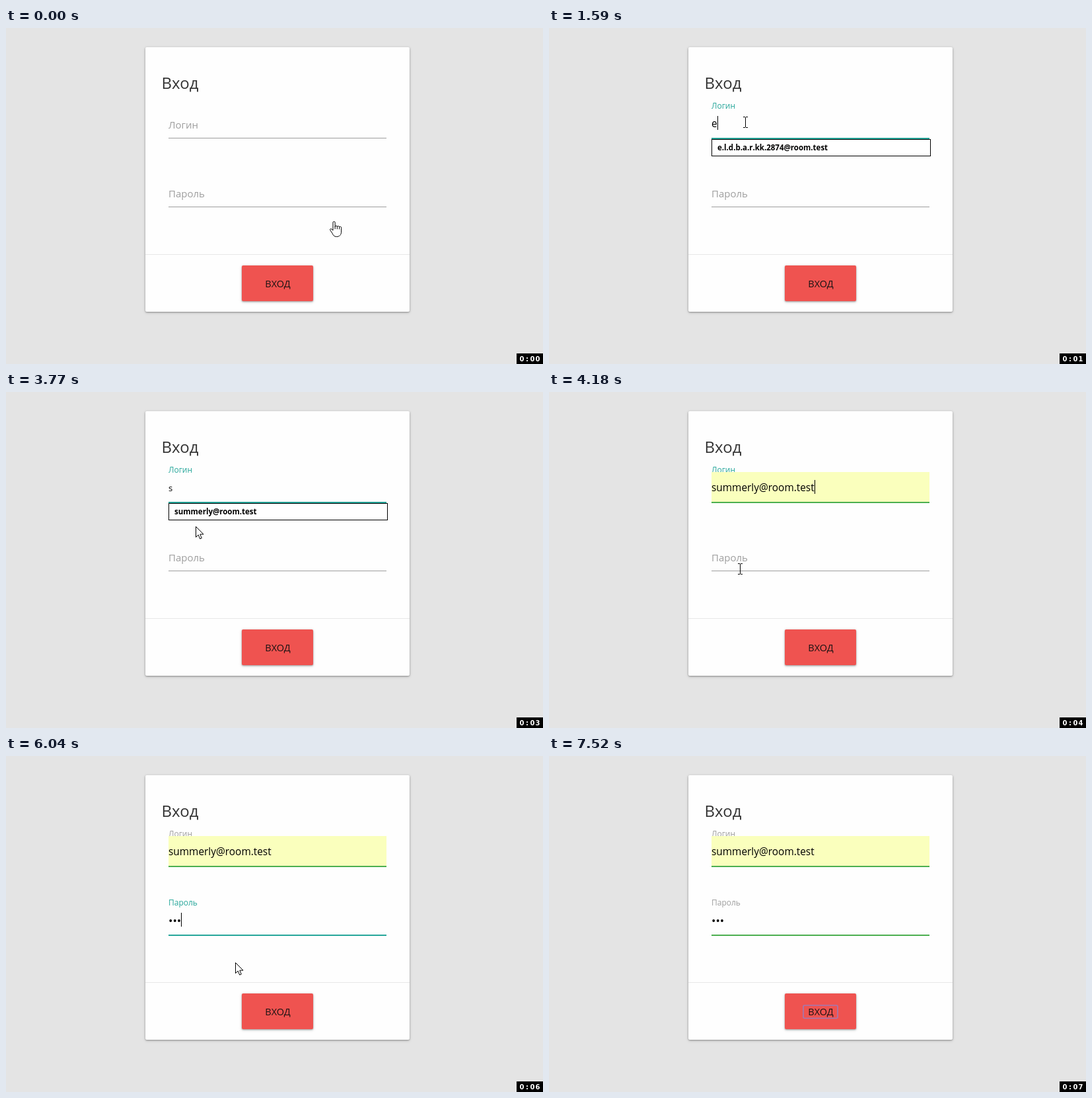
Recreate the animation shown at these times as an HTML page. Size 813 px wide and 508 px high, loop 8 s.

```html
<!DOCTYPE html>
<html lang="ru">
<head>
<meta charset="utf-8">
<style>
  html, body { margin: 0; width: 100%; height: 100%; overflow: hidden; background: #e4e4e4; }
  svg { display: block; font-family: "Open Sans", "Noto Sans", sans-serif; }
  .raised { filter: drop-shadow(0 1px 1px rgba(0,0,0,.3)) drop-shadow(0 1px 2px rgba(0,0,0,.16)); }
  .popup text { font-size: 11.5px; font-weight: 700; }
  .cursor path { fill: #fff; stroke: #000; }
</style>
</head>
<body>
<svg width="813" height="508" viewBox="0 0 813 508">
  <defs><clipPath id="buttonClip"><rect x="357" y="359" width="108" height="54" rx="2"/></clipPath></defs>
  <rect class="raised" x="211" y="29" width="400" height="400" rx="2" fill="#fefefe"/>
  <text x="235.5" y="92" font-size="24" fill="#333">Вход</text>
  <rect x="211" y="342" width="400" height="1" fill="#e8e8e8"/>

  <text id="loginLabel" x="246">Логин</text>
  <rect id="autofill" x="246" y="121" width="330" height="45" fill="#faffbd"/>
  <rect id="loginLine" x="246" y="166" width="330"/>
  <text id="loginText" x="246" y="150"></text>

  <text id="passLabel" x="246">Пароль</text>
  <rect id="passLine" x="246" y="270" width="330"/>
  <text id="passText" x="246" y="255" font-size="17"></text>
  <rect id="caret" width="1" height="21"/>

  <g id="popup" class="popup">
    <rect x="246.5" y="168.5" width="331" height="25" fill="#fff" stroke="#000"/>
    <text id="popupText" x="255" y="185"></text>
  </g>

  <rect class="raised" x="357" y="359" width="108" height="54" rx="2" fill="#ef5350"/>
  <circle id="ripple" cx="409" cy="387" fill="#fff" clip-path="url(#buttonClip)"/>
  <text x="411.5" y="392" font-size="14.5" text-anchor="middle" fill="#1c1414">ВХОД</text>
  <rect id="focusRing" x="385" y="377" width="52" height="19.5" rx="2" fill="none" stroke="#a07ab4" stroke-width="1.6"/>

  <g class="cursor">
    <path id="hand" d="M5 14V2.2a1.6 1.6 0 0 1 3.2 0V8.5a1.6 1.6 0 0 1 3.2.3 1.6 1.6 0 0 1 3.2.6 1.5 1.5 0 0 1 3 .9V16c0 5-3 7.5-7 7.5s-5-2-6.5-5L.8 13.6c-.8-1.6 1-2.5 2-1.7zM8.2 8v4M11.4 8.8v3.4M14.6 9.4v3"/>
    <path id="arrow" d="M.5.5V16.5l3.7-3.5 2.5 6 2.6-1.1-2.5-5.8h5.2z"/>
    <path id="beam" d="M-3-7.5h3M1-7.5h3M.5-7v15M-3 8.5h3M1 8.5h3"/>
  </g>

  <rect x="773" y="492" width="40" height="16"/>
  <text id="clock" x="781 789 797 805" y="503.5" text-anchor="middle" fill="#fff"
        style="font:bold 10px 'DejaVu Sans',sans-serif"></text>
</svg>
<script>
const LOOP = 8000;
const FIRST_MAIL = 'e.l.d.b.a.r.kk.2874@room.test';
const MAIL = 'summerly@room.test';
const GREY = '#9e9e9e', TEAL = '#26a69a', GREEN = '#4caf50';

// Key moments, ms
const FOCUS_LOGIN = 830, TYPE_FIRST = 1450, ERASE = 2370, TYPE_SECOND = 2760;
const PREVIEW = 3640, FILL = 3900, FOCUS_PASS = 4450, PRESS = 6490, RIPPLE = 6586, LEAVE = 7520;
const DOTS = [5400, 5550, 5710];
const CARET_RESETS = [FOCUS_LOGIN, TYPE_FIRST, ERASE, TYPE_SECOND, FILL, FOCUS_PASS, ...DOTS];

// Screen updates: start, end, number of steps
const BURSTS = [[280, 560, 3], [830, 1170, 4], [1450, 2370, 8], [2760, 3010, 3],
  [3380, 4310, 8], [4450, 5120, 6], [5400, 6340, 7], [6490, 7520, 8]];

// Pointer path: time, x, y, shape
const POINTER = [
  [0, 490, 292, 'hand'], [270, 490, 292, 'hand'], [280, 440, 250, 'arrow'], [420, 340, 178, 'arrow'],
  [560, 297, 142, 'beam'], [3380, 297, 142, 'beam'], [3510, 292, 160, 'beam'], [3640, 288, 188, 'arrow'],
  [3770, 287, 204, 'arrow'], [3900, 287, 190, 'arrow'], [4040, 288, 240, 'beam'], [4175, 289, 267, 'beam'],
  [4310, 292, 260, 'beam'], [5860, 292, 260, 'beam'], [6020, 345, 310, 'arrow'],
  [6180, 392, 364, 'arrow'], [6340, 409, 388, 'arrow'], [LOOP, 409, 388, 'arrow']];

const el = Object.fromEntries([...document.querySelectorAll('[id]')].map(node => [node.id, node]));
const clamp = v => Math.max(0, Math.min(1, v));
const easeOut = p => 1 - (1 - clamp(p)) ** 2;
const show = (node, visible) => node.style.display = visible ? '' : 'none';
const set = (node, attrs) => { for (const name in attrs) node.setAttribute(name, attrs[name]); };
const between = (t, from, to) => t >= from && t < to;

function snap(t) {
  const burst = BURSTS.findLast(b => b[0] <= t);
  if (!burst) return 0;
  const [start, end, count] = burst, step = (end - start) / (count - 1);
  return start + step * Math.min(count - 1, Math.floor((t - start + 25) / step));
}

function drawLabel(label, t, start, restY, color) {
  const lift = easeOut((t - start + 50) / 200) * (t >= start);
  set(label, { y: restY - 30 * lift, 'font-size': 15 - 3 * lift, fill: color });
}

function drawLine(line, color) {
  set(line, { height: color === GREY ? 1 : 2, fill: color });
}

function drawPointer(t) {
  const i = POINTER.findLastIndex(k => k[0] <= t);
  const [start, x, y, shape] = POINTER[i];
  const [end, nextX, nextY] = POINTER[i + 1];
  const p = (t - start) / (end - start);
  for (const name of ['hand', 'arrow', 'beam']) show(el[name], name === shape && t < LEAVE);
  const at = (a, b) => Math.round(a + (b - a) * p);
  set(el[shape], { transform: `translate(${at(x, nextX)} ${at(y, nextY)})` });
}

function drawCaret(t) {
  const reset = CARET_RESETS.findLast(k => k <= t);
  const inPass = t >= FOCUS_PASS;
  const text = inPass ? el.passText : el.loginText;
  show(el.caret, reset !== undefined && t < PRESS && (t - reset) % 1060 < 530);
  set(el.caret, {
    x: 246 + (text.textContent ? Math.round(text.getComputedTextLength()) : 0),
    y: inPass ? 237 : 133
  });
}

function draw(t) {
  const loginActive = between(t, FOCUS_LOGIN, FOCUS_PASS);
  const passActive = between(t, FOCUS_PASS, PRESS);
  drawLabel(el.loginLabel, t, FOCUS_LOGIN, 152, loginActive ? TEAL : GREY);
  drawLabel(el.passLabel, t, FOCUS_PASS, 256, passActive ? TEAL : GREY);
  drawLine(el.loginLine, t >= FILL ? GREEN : loginActive ? TEAL : GREY);
  drawLine(el.passLine, t >= PRESS ? GREEN : passActive ? TEAL : GREY);

  const typingFirst = between(t, TYPE_FIRST, ERASE);
  const typingSecond = between(t, TYPE_SECOND, FILL);
  el.loginText.textContent = t >= FILL ? MAIL : typingFirst ? FIRST_MAIL[0] : typingSecond ? MAIL[0] : '';
  set(el.loginText, { 'font-size': between(t, PREVIEW, FILL) ? 13 : 15.4 });
  el.passText.textContent = '•'.repeat(DOTS.filter(k => k <= t).length);
  show(el.autofill, t >= FILL);
  show(el.popup, typingFirst || typingSecond);
  el.popupText.textContent = typingFirst ? FIRST_MAIL : MAIL;

  show(el.focusRing, t >= PRESS);
  set(el.ripple, {
    r: 108 * easeOut((t - RIPPLE) / 750),
    opacity: .2 * clamp(1 - (t - 6900) / 600)
  });
  el.clock.textContent = '0:0' + Math.floor(t / 1000);
  drawCaret(t);
  drawPointer(t);
}

function tick() {
  draw(snap(performance.now() % LOOP));
  requestAnimationFrame(tick);
}
tick();
</script>
</body>
</html>
```
